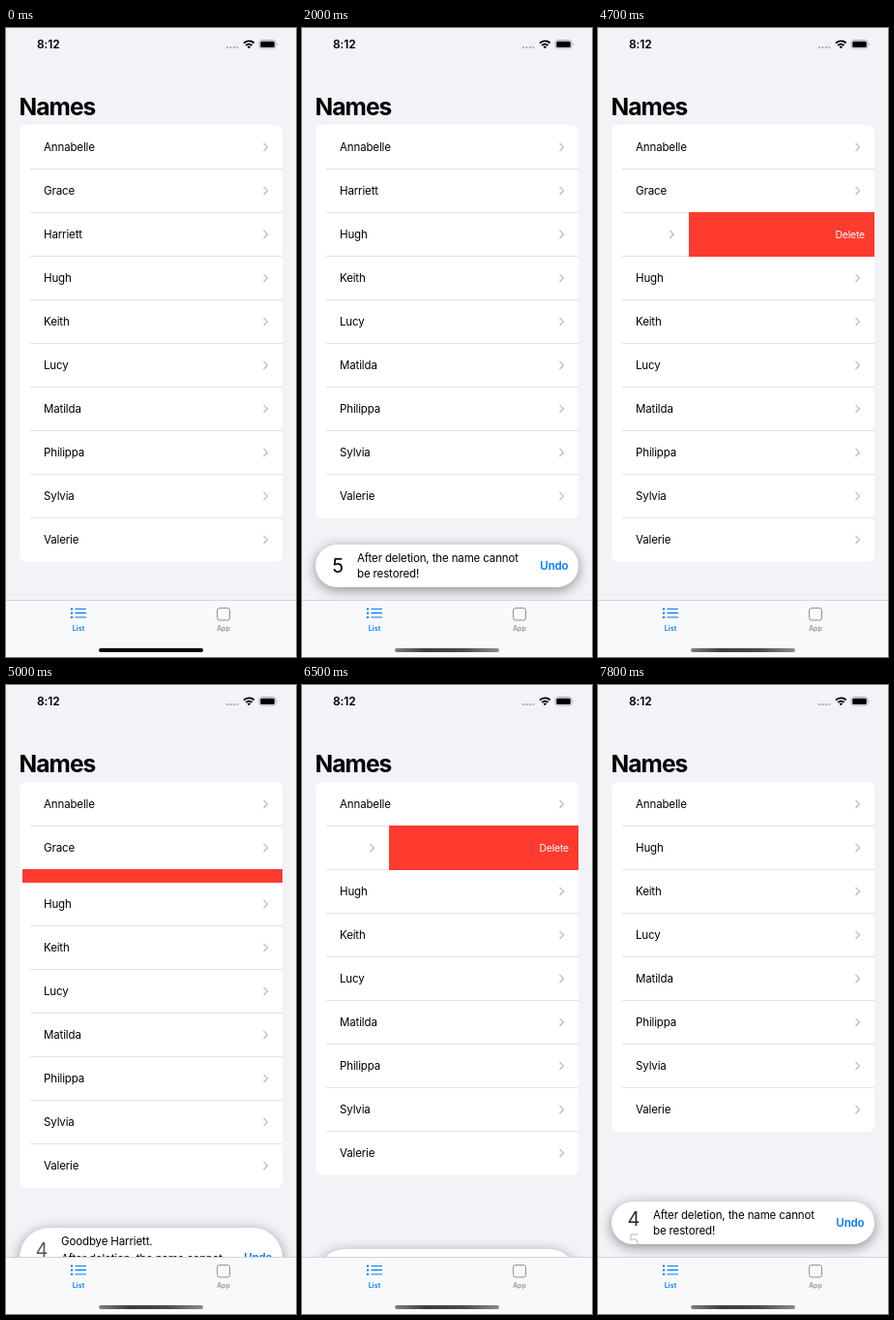
An HTML page that plays this animation: 300x649 px, repeating every 8000 ms.

```html
<!DOCTYPE html>
<html lang="en">
<head>
<meta charset="utf-8">
<title>Names</title>
<style>
html, body { margin: 0; width: 100%; height: 100%; overflow: hidden; }
body {
  position: relative; background: #f2f2f7; color: #000;
  font: 11.5px Inter, "Liberation Sans", sans-serif; letter-spacing: -.13px; white-space: nowrap;
}
div, svg { position: absolute; }
h1 { position: absolute; margin: 0; left: 13.5px; top: 66px; font: 700 24.5px/30px Inter, "Liberation Sans", sans-serif; letter-spacing: -.95px; }
#clock { left: 32px; top: 9px; font-size: 12px; font-weight: 600; line-height: 16px; }
#list { left: 14px; top: 100px; width: 272px; border-radius: 7px; overflow: hidden; background: #fff; isolation: isolate; }
.row { width: 272px; overflow: hidden; }
.cell { bottom: 0; width: 272px; height: 46px; line-height: 46px; }
.front { width: 272px; height: 46px; padding-left: 25px; box-sizing: border-box; }
.front svg { left: 251px; top: 17px; }
.sep { left: 11px; right: 0; top: 0; height: 1px; background: #e2e2e5; }
.del { right: 0; height: 46px; overflow: hidden; background: #ff3b30; color: #fff; font-size: 10.3px; }
.del div { right: 10px; }
#toast {
  left: 14px; width: 272px; overflow: hidden; background: #fff;
  box-shadow: 0 3px 13px rgba(0, 0, 0, .42); line-height: 15.4px;
}
.num { left: 13px; width: 20px; margin-top: -12px; text-align: center; font-size: 20px; line-height: 24px; }
#msg { left: 43px; bottom: 6px; }
#undo { right: 10.5px; margin-top: -8px; line-height: 16px; font-weight: 600; color: #007aff; }
#tabs { left: 0; top: 590px; width: 300px; height: 59px; box-sizing: border-box; border-top: 1px solid #d4d4d8; background: #f9f9fb; }
.tab { top: 24px; width: 150px; text-align: center; font-size: 7.2px; font-weight: 600; line-height: 10px; letter-spacing: 0; }
#home { left: 96px; top: 640px; width: 108px; height: 4px; border-radius: 2px; }
</style>
</head>
<body>
<div id="clock">8:12</div>
<svg width="300" height="30" style="left:0;top:0">
  <path d="M228 20h12" stroke="#b0b0b6" stroke-width="2" stroke-dasharray="2 1.4"/>
  <path d="M246 15.6a7.4 7.4 0 0 1 10.6 0M248.2 18a4.4 4.4 0 0 1 6.2 0" fill="none" stroke="#000" stroke-width="1.9"/>
  <path d="M249.6 19.4a2.4 2.4 0 0 1 3.4 0l-1.7 1.8z"/>
  <rect x="262" y="12.5" width="17" height="8.6" rx="2.6" fill="none" stroke="#a0a0a4" stroke-width=".8"/>
  <rect x="263.2" y="13.7" width="14.6" height="6.2" rx="1.5"/>
  <path d="M280 15.3q1.4 1.5 0 3z" fill="#a0a0a4"/>
</svg>
<h1>Names</h1>
<div id="list"></div>
<div id="toast">
  <div class="num" id="five">5</div>
  <div class="num" id="four">4</div>
  <div id="bye" style="left:43px;top:7px">Goodbye Harriett.</div>
  <div id="msg">After deletion, the name cannot<br>be restored!</div>
  <div id="undo">Undo</div>
</div>
<div id="tabs">
  <svg width="300" height="24" style="left:0;top:0" fill="none">
    <path d="M71.5 8.5h11.5M71.5 12.7h11.5M71.5 17h11.5" stroke="#007aff" stroke-width="1.2"/>
    <path d="M67 8.5h2M67 12.7h2M67 17h2" stroke="#007aff" stroke-width="2"/>
    <rect x="218.5" y="7.5" width="13" height="12.5" rx="2.5" stroke="#929296"/>
  </svg>
  <div class="tab" style="color:#007aff">List</div>
  <div class="tab" style="left:150px;color:#98989c">App</div>
</div>
<div id="home"></div>
<script>
const $ = id => document.getElementById(id);
const names = ["Annabelle", "Grace", "Harriett", "Hugh", "Keith", "Lucy", "Matilda", "Philippa", "Sylvia", "Valerie"];
const ROW = 45, LOOP = 8000, STEP = 100;

// Each row overlaps the next by one pixel, where the separator lies
const rows = names.map((name, i) => {
  const row = document.createElement("div");
  row.className = "row";
  row.style.zIndex = names.length - i;
  row.innerHTML = `${i ? '<div class="sep"></div>' : ""}
    <div class="cell"><div class="front">${name}
    <svg width="8" height="12" fill="none"><path d="M1.5 1.8l4 4.1-4 4.1" stroke="#b8b8bc" stroke-width="1.2"/></svg></div>
    <div class="del"><div>Delete</div></div></div>`;
  $("list").append(row);
  return { row, front: row.querySelector(".front"), del: row.querySelector(".del"), label: row.querySelector(".del div") };
});

// Eased 0..1 progress from a start time over a duration
function ease(t, start, dur) {
  const x = Math.min(1, Math.max(0, (t - start) / dur));
  return x * x * (3 - 2 * x);
}

function drawList(t) {
  const height = names.map(() => 1), swipe = names.map(() => 0);
  height[1] = 1 - ease(t, 1700, 300) + ease(t, 2900, 350) - ease(t, 6550, 310);
  height[2] = 1 - ease(t, 4800, 310);
  swipe[1] = t < 2500 ? ease(t, 1050, 650) : ease(t, 6250, 380);
  swipe[2] = ease(t, 4450, 386);
  let y = 0;
  rows.forEach((r, i) => {
    const h = ROW * height[i], d = 269 * swipe[i];
    r.row.style.display = h > 0 ? "block" : "none";
    r.row.style.top = y + "px";
    r.row.style.height = h + 1 + "px";
    r.front.style.transform = `translateX(${-d}px)`;
    r.del.style.width = d + "px";
    // The label jumps to the leading side on a full swipe
    r.label.style.right = 10 + Math.max(0, d - 220) * 4.4 + "px";
    y += h;
  });
  $("list").style.height = y + 1 + "px";
}

function drawToast(t) {
  const tall = t > 4500 && t < 6610, h = tall ? 62 : 44;
  const shown = ease(t, 1750, 250) - ease(t, 2980, 290)
    + ease(t, 4850, 300) - ease(t, 6300, 300) + ease(t, 6620, 290);
  const s = $("toast").style;
  s.display = shown > .001 ? "block" : "none";
  s.height = h + "px";
  s.borderRadius = h / 2 + "px";
  s.top = 577 - h + (1 - shown) * (h + 28) + "px";
  $("bye").style.display = tall ? "block" : "none";

  const roll = ease(t, 2700, 300) - ease(t, 4900, 250)
    + ease(t, 5770, 300) - ease(t, 6670, 300) + ease(t, 7550, 340);
  $("five").style.top = h / 2 + 23 * roll + "px";
  $("four").style.top = h / 2 - 23 * (1 - roll) + "px";
  $("five").style.opacity = 1 - roll;
  $("four").style.opacity = roll;
  $("undo").style.top = h / 2 + "px";
  $("undo").style.opacity = t >= 2900 && t < 3300 ? .7 : 1;
}

function frame(now) {
  const t = Math.floor(now % LOOP / STEP) * STEP;
  drawList(t);
  drawToast(t);
  $("home").style.background = t < 1100 ? "#000" : "linear-gradient(90deg, #808080, #3c3c3c 30%, #4a4a4a 65%, #8c8c8c)";
  requestAnimationFrame(frame);
}
frame(performance.now());
</script>
</body>
</html>
```
